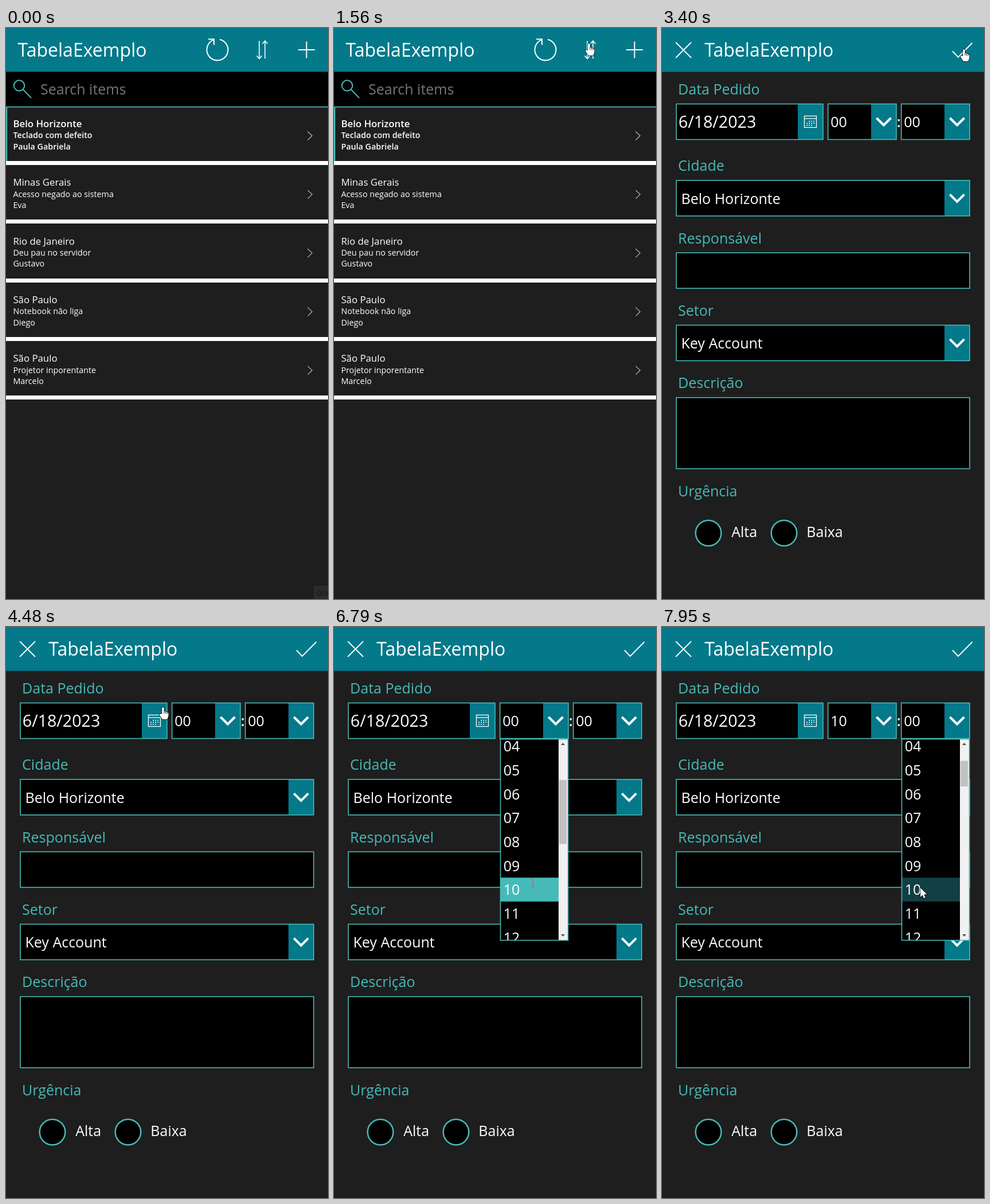
An HTML page with a canvas for the animation above (8000 ms loop, 562 px wide and 996 px high).

```html
<!DOCTYPE html>
<html lang="pt">
<head>
<meta charset="utf-8">
<title>TabelaExemplo</title>
<style>
html, body { margin: 0; width: 100%; height: 100%; overflow: hidden; background: #1e1e1e; }
canvas { display: block; }
</style>
</head>
<body>
<canvas id="stage" width="562" height="996"></canvas>
<script>
const ctx = document.getElementById('stage').getContext('2d');
const LOOP = 8000, STEP = 67.9;
const TEAL = '#03798a', AQUA = '#46bab8', BACK = '#1e1e1e', HOVER = '#123f44', PRESS = '#035e6b';
const FORM_AT = 3390, HOUR_OPEN = 5690, BEAM_AT = 6300, HOUR_PICK = 6850, MIN_OPEN = 7060;
const LEFT = 25, WIDTH = 512, BOX = 62, BUTTON = 44, LIST_PITCH = 102.3;
const OPTION = 41.67, POP_TOP = 195.5, POP_HEIGHT = 351, POP_WIDTH = 118;

const tickets = [
  ['Belo Horizonte', 'Teclado com defeito', 'Paula Gabriela'],
  ['Minas Gerais', 'Acesso negado ao sistema', 'Eva'],
  ['Rio de Janeiro', 'Deu pau no servidor', 'Gustavo'],
  ['São Paulo', 'Notebook não liga', 'Diego'],
  ['São Paulo', 'Projetor inporentante', 'Marcelo']
];

// pointer glides: where to, and between which times
const glides = [
  { x: 297, y: 226, from: 530, to: 800 },
  { x: 445, y: 27, from: 930, to: 1560 },
  { x: 527, y: 37, from: 1690, to: 1970 },
  { x: 545, y: 526, from: 3720, to: 4010 },
  { x: 274, y: 140, from: 4080, to: 4480 },
  { x: 374, y: 163, from: 4870, to: 5430 },
  { x: 346, y: 438, from: 5760, to: 6110 },
  { x: 508, y: 168, from: 6850, to: 7060 },
  { x: 475, y: 494, from: 7070, to: 7330 },
  { x: 451, y: 455, from: 7550, to: 7940 }
];

const hand = new Path2D('M-1.8 12V1.6Q-1.8 0 0 0Q1.8 0 1.8 1.6V7L4.5 7.5L7 8.5L9.5 10V15L7.5 21H-1L-5.5 14.5Q-7 11.2-4 11.2Z');
const arrow = new Path2D('M0 0V16L3.7 12.6L6 18L8.6 17L6.3 11.6L11.3 11.3Z');

function ease(t, from, to) {
  const k = Math.min(1, Math.max(0, (t - from) / (to - from)));
  return k * k * (3 - 2 * k);
}

function pointer(t) {
  let x = 498, y = 913;
  for (const g of glides) {
    const k = ease(t, g.from, g.to);
    x += (g.x - x) * k;
    y += (g.y - y) * k;
  }
  return { x, y };
}

function inside(p, x, y, w, h) {
  return p.x > x && p.x < x + w && p.y > y && p.y < y + h;
}

function rect(x, y, w, h, fill) {
  ctx.fillStyle = fill;
  ctx.fillRect(x, y, w, h);
}

function frame(x, y, w, h, color = AQUA, width = 1.6) {
  ctx.lineWidth = width;
  ctx.strokeStyle = color;
  ctx.strokeRect(x, y, w, h);
}

function text(s, x, y, size = 25, color = '#fff', weight = 400) {
  ctx.font = `${weight} ${size}px "Open Sans", sans-serif`;
  ctx.fillStyle = color;
  ctx.fillText(s, x, y);
}

function line(points, width, color = '#fff') {
  ctx.beginPath();
  for (let i = 0; i < points.length; i += 2) ctx.lineTo(points[i], points[i + 1]);
  ctx.lineWidth = width;
  ctx.strokeStyle = color;
  ctx.stroke();
}

function circle(x, y, r, width, color, from = 0, to = 2 * Math.PI) {
  ctx.beginPath();
  ctx.arc(x, y, r, from, to);
  ctx.lineWidth = width;
  ctx.strokeStyle = color;
  ctx.stroke();
}

// V shape with its tip at x, y
function vee(x, y, w, h, width) {
  line([x - w, y - h, x, y, x + w, y - h], width);
}

function header(x) {
  rect(0, 0, 562, 76.6, TEAL);
  text('TabelaExemplo', x, 50, 32);
}

function headerIcons() {
  const y = 38;
  circle(369, y, 18.5, 2, '#fff', -1.35, 4.36);
  line([353, y - 18.5, 363, y - 18.5, 363, y - 8.5], 2);
  for (const d of [1, -1]) {
    const x = 447 - d * 5;
    line([x, y - 15.5, x, y + 15.5], 1.6);
    vee(x, y + d * 15.5, 4.5, d * 5, 1.6);
  }
  line([510, y, 539, y], 2);
  line([524.5, y - 14.5, 524.5, y + 14.5], 2);
}

function searchBar(hover) {
  rect(0, 76.6, 562, 60.4, hover ? HOVER : '#000');
  rect(0, 136.8, 562, 1.7, AQUA);
  circle(23, 100.5, 9.2, 2, AQUA);
  line([29.5, 107, 44, 122], 2, AQUA);
  text('Search items', 60, 116, 25, '#757575');
}

function ticketRow(lines, i) {
  const y = 173 + i * LIST_PITCH;
  lines.forEach((s, n) =>
    text(s, 12.4, y + n * 19.4, n ? 14.3 : 16.8, '#fff', i ? 400 : 600));
  line([526.5, y + 7.5, 534.3, y + 15, 526.5, y + 22.5], 1.1, '#c4c4c4');
  rect(0, Math.round(y + 59), 562, 7, '#fff');
}

function tooltip(s, x, y, color) {
  rect(x, y, 562 - x, 24, '#2b2b2b');
  text(s, x + 5, y + 16.5, 12, color);
}

function listScreen(t, p) {
  header(20.5);
  if (t > 2720 && t < 2910) rect(484, 0, 78, 76.6, PRESS);
  headerIcons();
  searchBar(inside(p, 0, 77, 562, 61));
  tickets.forEach(ticketRow);
  rect(0, 138.5, 2.2, 93.5, AQUA);
  if (t < 60) tooltip('Grav', 537, 973, '#151515');
  if (t > 2500 && t < 2720) tooltip('New item', 535, 50, '#fff');
}

function field(x, y, w, h) {
  rect(x, y, w, h, '#000');
  frame(x, y, w, h);
}

function dropdown(x, y, w, value, pad, hover) {
  rect(x, y, w, BOX, hover ? HOVER : '#000');
  rect(x + w - BUTTON, y, BUTTON, BOX, hover ? PRESS : TEAL);
  frame(x, y, w, BOX);
  vee(x + w - BUTTON / 2, y + 37, 12.5, 12.5, 4);
  text(value, x + pad, y + 40.8);
}

function datePicker(y) {
  rect(LEFT, y, 256, BOX, '#000');
  rect(237, y, BUTTON, BOX, TEAL);
  frame(LEFT, y, 256, BOX);
  frame(248.5, y + 21, 21, 20, '#fff', 1.3);
  line([248, y + 25.5, 270, y + 25.5], 1.3);
  for (let i = 1; i < 11; i++)
    rect(252.3 + i % 4 * 4, y + 29.3 + Math.floor(i / 4) * 3.5, 1.8, 1.8, '#fff');
  text('6/18/2023', 28.8, y + 41.8, 28.6);
}

function dateRow(y, t, p) {
  const picked = t > HOUR_PICK;
  datePicker(y);
  dropdown(289.7, y, 119.3, picked ? '10' : '00', 4.6,
    !picked && inside(p, 289, y, 120, BOX));
  text(':', 409.8, y + 40.8, 25, '#fff', 600);
  dropdown(417.7, y, 119.3, '00', 4.6);
}

function radio(x, y, label, gap) {
  ctx.beginPath();
  ctx.arc(x, y, 22.3, 0, 2 * Math.PI);
  ctx.fillStyle = '#000';
  ctx.fill();
  circle(x, y, 22.3, 2.5, AQUA);
  text(label, x + gap, y + 7);
}

function radioRow(y) {
  radio(81, y + 48, 'Alta', 40.2);
  radio(213, y + 48, 'Baixa', 39.3);
}

// label, height of the control, control
const sections = [
  ['Data Pedido', 69, dateRow],
  ['Cidade', BOX, y => dropdown(LEFT, y, WIDTH, 'Belo Horizonte', 8.5)],
  ['Responsável', BOX, y => field(LEFT, y, WIDTH, BOX)],
  ['Setor', BOX, y => dropdown(LEFT, y, WIDTH, 'Key Account', 8.5)],
  ['Descrição', 124, y => field(LEFT, y, WIDTH, 124)],
  ['Urgência', 0, radioRow]
];

function options(x, count, scroll, p, pressed) {
  ctx.save();
  ctx.beginPath();
  ctx.rect(x, POP_TOP, 102, POP_HEIGHT);
  ctx.clip();
  for (let i = 0; i < count; i++) {
    const y = POP_TOP + i * OPTION - scroll;
    if (inside(p, x, y, 102, OPTION)) rect(x, y, 102, OPTION, pressed ? AQUA : HOVER);
    else if (i === 0) rect(x, y, 102, OPTION, TEAL);
    text(String(i).padStart(2, '0'), x + 5.2, y + 30);
  }
  ctx.restore();
}

function scrollbar(x, total, scroll) {
  const scale = 318 / total, mid = POP_TOP + POP_HEIGHT / 2;
  rect(x, POP_TOP, 16, POP_HEIGHT, '#f1f1f1');
  rect(x + 1, 211.3 + scroll * scale, 13, POP_HEIGHT * scale, '#c1c1c1');
  ctx.fillStyle = '#505050';
  for (const d of [-1, 1]) {
    const y = mid + d * 165;
    ctx.beginPath();
    ctx.moveTo(x + 4, y);
    ctx.lineTo(x + 11, y);
    ctx.lineTo(x + 7.5, y + d * 4);
    ctx.fill();
  }
}

function popup(x, count, scroll, p, pressed) {
  rect(x, POP_TOP, POP_WIDTH, POP_HEIGHT, '#000');
  options(x, count, scroll, p, pressed);
  scrollbar(x + 101.5, count * OPTION, scroll);
  frame(x, POP_TOP, POP_WIDTH, POP_HEIGHT);
}

function formScreen(t, p) {
  header(74.3);
  line([24, 25, 51, 52], 1.8);
  line([51, 25, 24, 52], 1.8);
  line([507, 40.5, 517, 51, 541.5, 26], 1.9);

  let y = 116;
  for (const [label, height, control] of sections) {
    text(label, 28.1, y, 25, AQUA);
    control(y + 16.5, t, p);
    y += height + 64.3;
  }

  if (t > HOUR_OPEN && t < HOUR_PICK)
    popup(290.5, 24, 175 * ease(t, 6530, 6770), p, t > 6770);
  if (t > MIN_OPEN)
    popup(418.5, 60, 175 * ease(t, 7248, 7540), p, false);
}

function textBeam() {
  const red = '#b5605f';
  line([1, 0, 1, 15], 1, red);
  for (const y of [0, 15]) line([-2, y, 4, y], 1, red);
}

function drawPointer(t, p) {
  if (t < 520) return;
  ctx.save();
  ctx.translate(p.x, p.y);
  if (t > BEAM_AT && t < HOUR_PICK) {
    textBeam();
  } else {
    const clickable = t < 3750 || (t > 4470 && p.x < 289);
    const shape = clickable ? hand : arrow;
    ctx.lineWidth = 1.6;
    ctx.strokeStyle = '#000';
    ctx.stroke(shape);
    ctx.fillStyle = '#fff';
    ctx.fill(shape);
    if (clickable)
      for (let i = 0; i < 3; i++)
        line([1.8 + i * 2.6, 7 + i, 1.8 + i * 2.6, 11 + i / 2], 0.8, '#000');
  }
  ctx.restore();
}

function draw(now) {
  // the screen advances in fixed steps
  const t = Math.floor((now % LOOP + 8) / STEP) * STEP;
  const p = pointer(t);
  rect(0, 0, 562, 996, BACK);
  if (t < FORM_AT) listScreen(t, p);
  else formScreen(t, p);
  drawPointer(t, p);
}

const start = performance.now();
function tick() {
  draw(performance.now() - start);
  requestAnimationFrame(tick);
}
tick();
</script>
</body>
</html>
```
